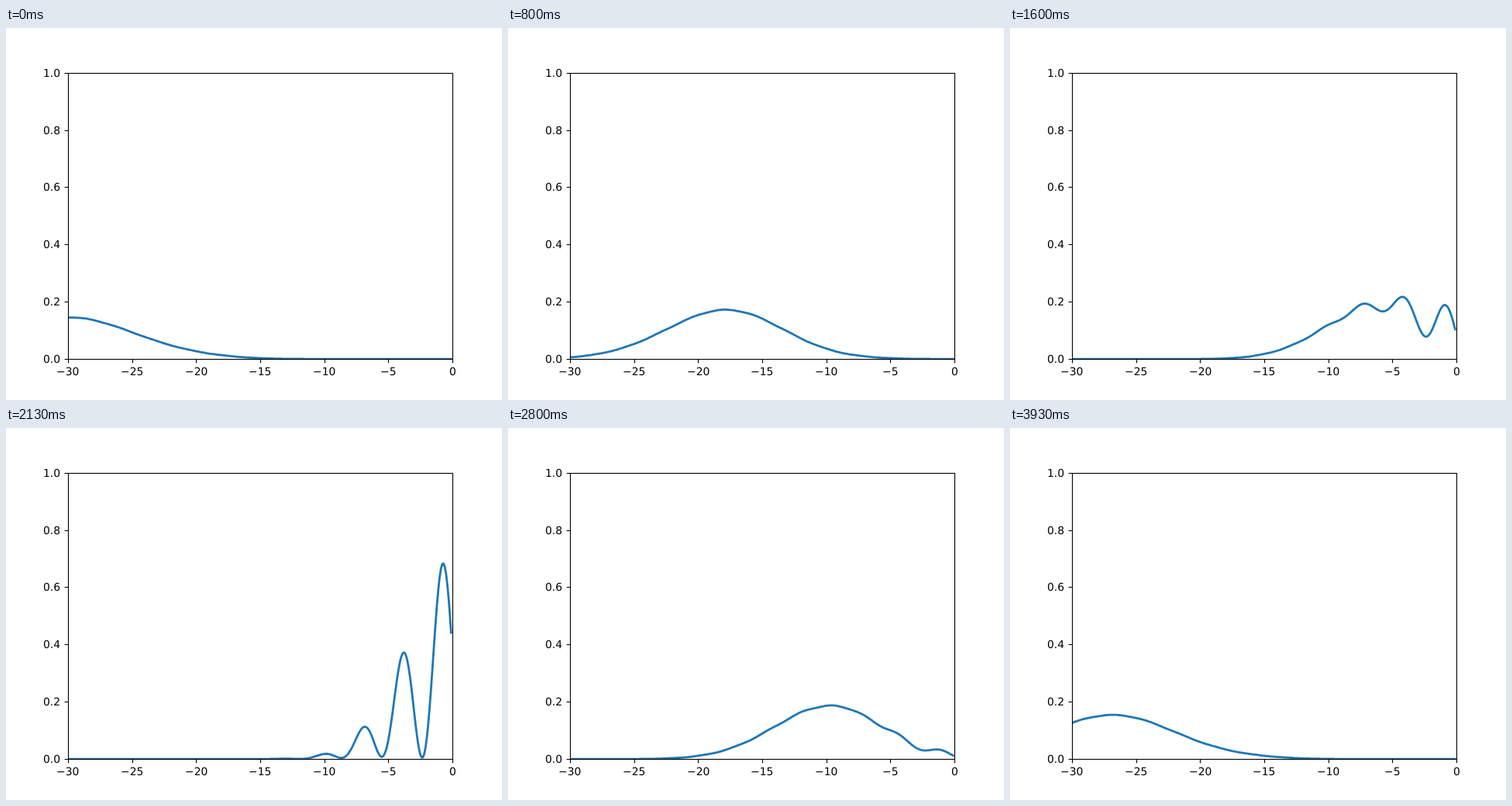
Recreate the animation shown at these times as an HTML page with a canvas. Size 640x480 px, loop 3.99 s.

```html
<!DOCTYPE html>
<html lang="en">
<head>
<meta charset="utf-8">
<title>Wave packet reflected by a potential step</title>
<style>
  html, body { margin: 0; width: 100%; height: 100%; overflow: hidden; background: #fff; }
  canvas { display: block; width: 640px; height: 480px; }
</style>
</head>
<body>
<canvas id="plot" width="640" height="480"></canvas>
<script>
const ctx = document.getElementById('plot').getContext('2d');

const LOOP = 3990, STEPS = 60;
const LEFT = 80, RIGHT = 576, TOP = 57.6, BOTTOM = 427.2;
const X_MIN = -30, DX = 0.1, POINTS = 300;
const PT = 100 / 72;

const px = x => RIGHT + x * (RIGHT - LEFT) / 30;
const py = y => BOTTOM - y * (BOTTOM - TOP);
const snap = v => Math.floor(v + 0.5) + 0.5;

// Gaussian packet around k = 1 hitting a step of height 1 (hbar = m = 1),
// summed over the totally reflected wave numbers 0 < k < sqrt(2).
const MODES = 400, DK = Math.SQRT2 / MODES;
const modes = Array.from({ length: MODES }, (_, i) => {
  const k = (i + 0.5) * DK;
  return {
    k,
    theta: Math.atan2(Math.sqrt(2 - k * k), k),
    weight: 2 * DK * Math.exp(-16 * (k - 1) ** 2)
  };
}).filter(m => m.weight > 1e-8);

function density(t) {
  const re = new Float64Array(POINTS), im = new Float64Array(POINTS);
  for (const { k, theta, weight } of modes) {
    const phase = theta + k * k * t / 2;
    const a = weight * Math.cos(phase), b = -weight * Math.sin(phase);
    for (let i = 0; i < POINTS; i++) {
      const c = Math.cos(k * (X_MIN + i * DX) + theta);
      re[i] += a * c;
      im[i] += b * c;
    }
  }
  return re.map((r, i) => r * r + im[i] * im[i]);
}

const cache = [];
const curve = step => cache[step] || (cache[step] = density(step - 30));

function line(x1, y1, x2, y2) {
  ctx.beginPath();
  ctx.moveTo(x1, y1);
  ctx.lineTo(x2, y2);
  ctx.stroke();
}

// Text starts on a whole pixel; align is the share of its width left of x.
function label(text, x, y, align) {
  const width = ctx.measureText(text).width;
  ctx.fillText(text, Math.round(x - width * align), y);
}

function drawAxes() {
  ctx.strokeStyle = ctx.fillStyle = '#000';
  ctx.lineWidth = 0.8 * PT;
  ctx.lineCap = 'butt';
  ctx.font = 10 * PT + 'px "DejaVu Sans", sans-serif';
  ctx.textRendering = 'geometricPrecision';
  ctx.strokeRect(snap(LEFT), snap(TOP), RIGHT - LEFT, snap(BOTTOM) - snap(TOP));

  for (let v = -30; v <= 0; v += 5) {
    const x = px(v);
    line(snap(x), 428, snap(x), 432.4);
    label(String(v).replace('-', '\u2212'), x, 448, 0.5);
  }
  for (let i = 0; i <= 5; i++) {
    const y = py(i / 5);
    line(75.6, snap(y), 80, snap(y));
    label((i / 5).toFixed(1), LEFT - 7 * PT, Math.round(y + 5), 1);
  }
}

function drawCurve(values) {
  ctx.save();
  ctx.beginPath();
  ctx.rect(LEFT, 58, RIGHT - LEFT, 370);
  ctx.clip();
  ctx.strokeStyle = '#1f77b4';
  ctx.lineWidth = 2 * PT;
  ctx.lineCap = 'square';
  ctx.lineJoin = 'round';
  ctx.beginPath();
  values.forEach((v, i) => ctx.lineTo(px(X_MIN + i * DX), py(v)));
  ctx.stroke();
  ctx.restore();
}

function stepAt(ms) {
  let step = Math.min(STEPS - 1, Math.floor(ms * 3 / 200) + 1);
  while (Math.round(step * 20 / 3) * 10 > ms) step--;
  return step;
}

let start = null, shown = -1;
function tick(now) {
  if (start === null) start = now;
  const step = stepAt((now - start) % LOOP);
  if (step !== shown) {
    shown = step;
    ctx.fillStyle = '#fff';
    ctx.fillRect(0, 0, 640, 480);
    drawCurve(curve(step));
    drawAxes();
  }
  requestAnimationFrame(tick);
}
requestAnimationFrame(tick);
</script>
</body>
</html>
```
